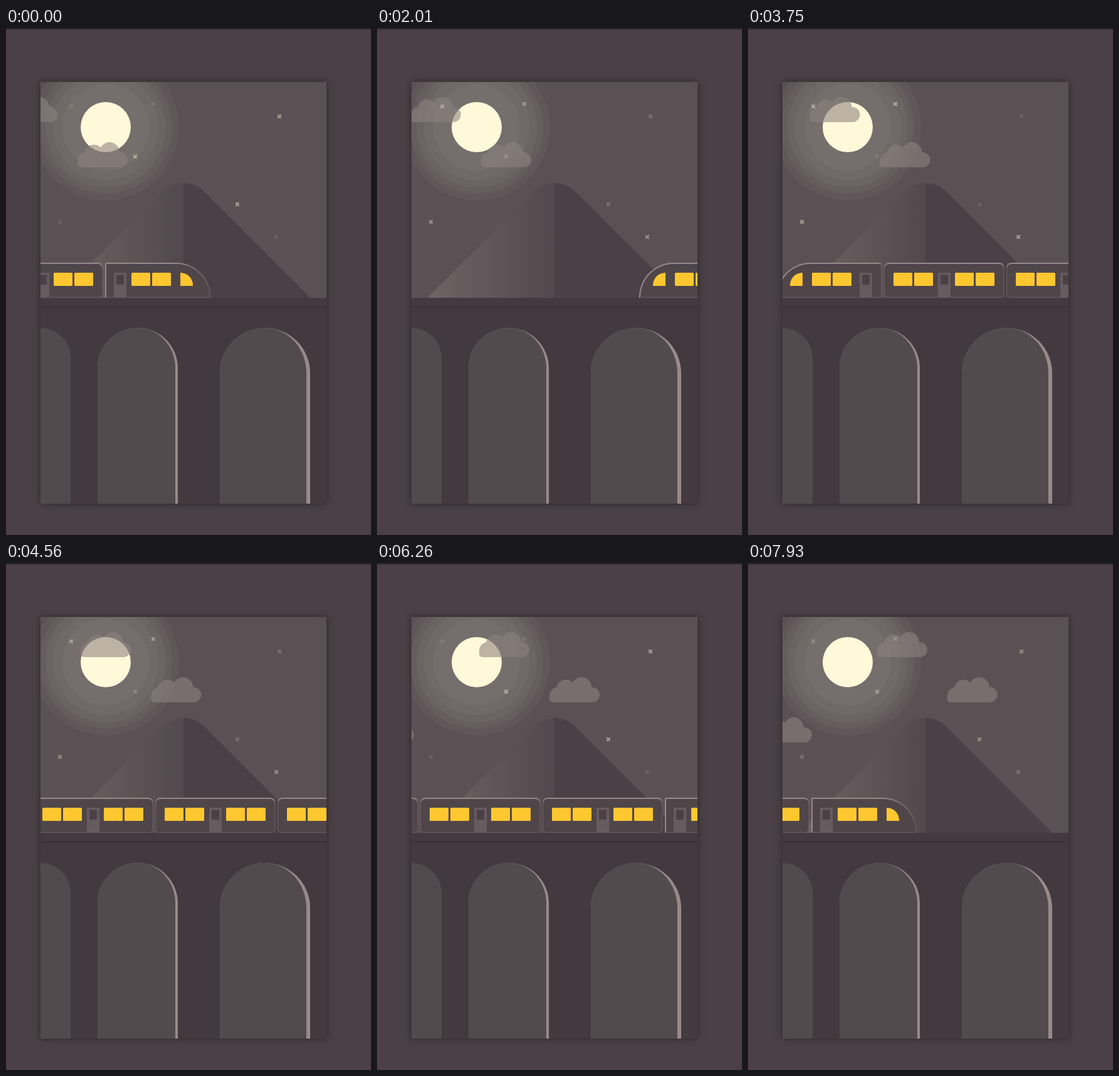
Write an HTML page with a canvas that moves like this. It is 582 px wide and 808 px high and loops after 8000 ms.

```html
<!DOCTYPE html>
<html lang="en">
<head>
<meta charset="utf-8">
<title>Night train</title>
<style>
html, body { margin: 0; width: 100%; height: 100%; overflow: hidden; background: #4b4045; }
canvas { display: block; }
</style>
</head>
<body>
<canvas id="stage" width="582" height="808"></canvas>
<script>
const ctx = document.getElementById('stage').getContext('2d');
const LOOP = 8000, TWINKLE = 6600;
const TRAIN_SPEED = 0.2143, CLOUD_SPEED = 0.0257;
const CARS = 4, PITCH = 195, CAB = 168;
const WALL = '#4b4045', BODY = '#50464a', LIGHT = '#958989', DIM = '#6a5f63', LAMP = '#ffc72f';
const STARS_A = [[436, 141], [369, 281], [206, 205]];
const STARS_B = [[235, 121], [104, 125], [86, 309], [431, 333]];

const smooth = k => k * k * (3 - 2 * k);

function rect(x, y, w, h, color) {
  ctx.fillStyle = color;
  ctx.fillRect(x, y, w, h);
}

function round(x, y, w, h, radii, color) {
  ctx.fillStyle = color;
  ctx.beginPath();
  ctx.roundRect(x, y, w, h, radii);
  ctx.fill();
}

function disc(x, y, r, color) {
  round(x - r, y - r, r * 2, r * 2, r, color);
}

function gradient(x0, y0, x1, y1, from, to) {
  const g = ctx.createLinearGradient(x0, y0, x1, y1);
  g.addColorStop(0, from);
  g.addColorStop(1, to);
  return g;
}

function drawMoon() {
  for (const r of [117, 106, 96, 84.5, 69]) disc(159, 158, r, 'rgba(255,248,217,.037)');
  disc(159, 158, 40, '#fff8d9');
}

function drawCloud(x, base) {
  ctx.fillStyle = 'rgba(141,131,128,.59)';
  ctx.beginPath();
  ctx.roundRect(x, base - 24, 80, 24, [14, 12, 12, 5]);
  for (const [dx, dy, r] of [[26, 21, 15], [51, 24, 16]]) {
    ctx.moveTo(x + dx + r, base - dy);
    ctx.arc(x + dx, base - dy, r, 0, Math.PI * 2);
  }
  ctx.fill();
}

function drawStars(stars, glow) {
  const arm = 2.7;
  ctx.strokeStyle = `rgba(255,248,225,${0.1 + 0.36 * glow})`;
  ctx.lineWidth = 2.2;
  ctx.beginPath();
  for (const [x, y] of stars) {
    for (const side of [-1, 1]) {
      ctx.moveTo(x - arm, y - arm * side);
      ctx.lineTo(x + arm, y + arm * side);
    }
  }
  ctx.stroke();
}

function drawMountain() {
  ctx.save();
  ctx.beginPath();
  ctx.moveTo(80.5, 430);
  ctx.arcTo(283, 227.5, 485.5, 430, 47);
  ctx.lineTo(485.5, 430);
  ctx.clip();
  rect(80, 240, 203, 190, gradient(81, 0, 283, 0, '#6e6365', '#53494d'));
  rect(283, 240, 203, 190, WALL);
  ctx.restore();
}

// The lit edge thins out towards the crown, so the right inner corner is elliptical.
function drawArch(x, right, lip) {
  const w = right - x, r = w / 2;
  if (lip) round(x, 478, w, 290, [r, r, 0, 0], '#988a8a');
  round(x, 478, w - lip, 290, [r, { x: r - lip, y: r }, 0, 0], '#534a4e');
}

function drawViaduct() {
  rect(55, 430, 456, 328, '#44393e');
  rect(55, 443.5, 456, 2, '#3a3035');
  drawArch(7, 103, 0);
  drawArch(146, 274, 4);
  drawArch(341, 485, 6);
}

function drawPane(x, radii = 1.5) {
  round(x, 390, radii === 1.5 ? 30 : 20, 21, radii, LAMP);
}

function drawDoor(x) {
  rect(x, 390, 20, 39.5, '#665b5f');
  rect(x + 4, 393.5, 12, 15.5, WALL);
}

function drawCar(x) {
  round(x, 374, 191.5, 56, [8, 8, 6, 6], gradient(0, 375, 0, 384, LIGHT, DIM));
  round(x + 1, 376, 189.5, 53, [7, 7, 5, 5], BODY);
  for (const side of [15, 113]) {
    drawPane(x + side);
    drawPane(x + side + 33);
  }
  drawDoor(x + 86);
}

function drawShell(x, outer, inner, fade) {
  const end = x + CAB;
  round(x, 374, CAB, 56, outer, gradient(end - fade, 374, end, 374 + fade, LIGHT, DIM));
  round(x + 2, 376, CAB - 3, 53, inner, BODY);
  rect(x + 1, 429, CAB - 2, 1, DIM);
}

function drawFront(x) {
  drawShell(x, [55, 3, 0, 0], [53, 2, 0, 0], 6);
  drawPane(x + 22, [20, 0, 0, 0]);
  drawPane(x + 57);
  drawPane(x + 90);
  drawDoor(x + 133);
}

function drawRear(x) {
  drawShell(x, [2, 55, 0, 0], [1, 54, 0, 0], 55);
  drawDoor(x + 14);
  drawPane(x + 42);
  drawPane(x + 75);
  drawPane(x + 120, [0, 20, 0, 0]);
}

function drawTrain(position) {
  const x = Math.ceil(position), cars = x + CAB + 4;
  drawFront(x);
  for (let i = 0; i < CARS; i++) drawCar(cars + i * PITCH);
  drawRear(cars + CARS * PITCH);
}

function drawWall() {
  rect(0, 0, 582, 808, WALL);
  rect(0, 0, 582, 1, '#3a3136');
  rect(0, 1, 582, 1, '#1e191c');
  ctx.save();
  ctx.shadowColor = 'rgba(0,0,0,.4)';
  ctx.shadowBlur = 11;
  rect(55, 86, 456, 672, '#5b5155');
  ctx.restore();
}

function draw(t) {
  const drift = 114 + CLOUD_SPEED * t;
  const travel = TRAIN_SPEED * t;
  const glow = smooth(0.5 + 0.5 * Math.cos(2 * Math.PI * t / TWINKLE));
  drawWall();
  ctx.save();
  ctx.beginPath();
  ctx.rect(55, 86, 456, 672);
  ctx.clip();
  drawMoon();
  drawCloud(drift, 222);
  drawCloud(drift - 112, 150);
  drawCloud(drift - 296, 286);
  drawStars(STARS_A, glow);
  drawStars(STARS_B, 1 - glow);
  drawMountain();
  drawViaduct();
  drawTrain(-794 - travel);
  drawTrain(848.3 - travel);
  ctx.restore();
}

const start = performance.now();
function tick() {
  draw((performance.now() - start) % LOOP);
  requestAnimationFrame(tick);
}
tick();
</script>
</body>
</html>
```
